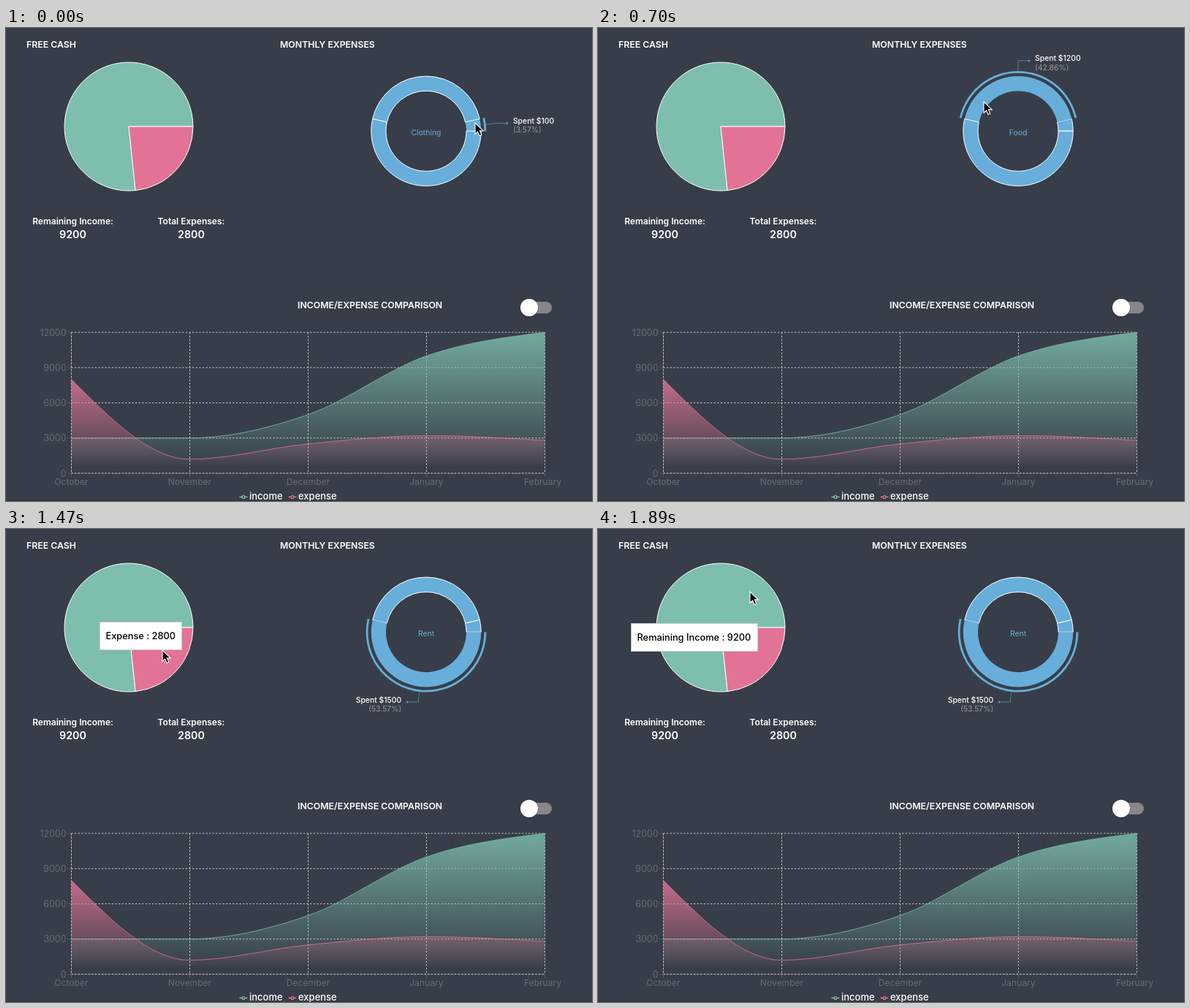
Write an HTML page that moves like this. It is 802 px wide and 648 px high and loops after 1.96 s.

```html
<!DOCTYPE html>
<html lang="en">
<head>
<meta charset="utf-8">
<title>Budget dashboard</title>
<style>
  html, body { margin: 0; width: 100%; height: 100%; overflow: hidden; background: #373e49; }
  svg { display: block; font-family: Inter, "Open Sans", sans-serif; }
  .title { font-size: 12.3px; font-weight: 600; fill: #fff; }
  .label { font-size: 12px; font-weight: 600; fill: #fff; }
  .value { font-size: 14.3px; font-weight: 600; fill: #fff; }
  .axis { font-size: 12.1px; fill: #696c72; }
  .num { font-size: 12.4px; }
  .legend { font-size: 13px; font-weight: 500; fill: #fff; }
  .note { font-size: 10.4px; font-weight: 500; fill: #fff; }
  .soft { font-weight: 400; fill: #999; }
  .mid { text-anchor: middle; }
  .end { text-anchor: end; }
  .tip { font-size: 12.8px; font-weight: 500; fill: #000; }
</style>
</head>
<body>
<svg id="stage" width="802" height="648" viewBox="0 0 802 648">
  <defs id="defs"></defs>
  <rect width="802" height="648" fill="#373e49"/>
  <rect y="647" width="802" height="1" fill="#30353f"/>
  <text class="title" x="28" y="27">FREE CASH</text>
  <text class="title" x="375" y="27">MONTHLY EXPENSES</text>
  <text class="title" x="399" y="384">INCOME/EXPENSE COMPARISON</text>
  <g class="mid">
    <text class="label" x="91.5" y="269">Remaining Income:</text>
    <text class="value" x="91.5" y="288">9200</text>
    <text class="label" x="253.5" y="269">Total Expenses:</text>
    <text class="value" x="253.5" y="288">2800</text>
  </g>
  <rect x="708" y="375" width="39" height="16" rx="8" fill="#888689"/>
  <circle cx="716" cy="384" r="12.3" fill="#000" opacity=".25"/>
  <circle cx="716" cy="383" r="12" fill="#fff"/>
  <g transform="translate(.5 .5)">
    <g id="chart"></g>
    <g id="pie"></g>
    <g id="ring"></g>
  </g>
  <g id="tip">
    <rect x=".5" y=".5" height="38" fill="#fff" stroke="#ccc"/>
    <text class="tip" x="8.5" y="24"></text>
  </g>
  <path id="cursor" d="M0 0V15.2L3.5 12 6 17.6 8.8 16.4 6.4 10.9H11.2Z" fill="#000" stroke="#fff" stroke-width="1.1"/>
</svg>
<script>
const GREEN = '#7ebeae', PINK = '#e27396', BLUE = '#68aedb';
const LOOP = 1960, STEP = 70;
const $ = id => document.getElementById(id);

// Angles are in degrees, counter-clockwise from the right.
function polar(cx, cy, r, deg) {
  const a = deg * Math.PI / 180;
  return [cx + r * Math.cos(a), cy - r * Math.sin(a)];
}

function sector(cx, cy, inner, outer, from, to) {
  const big = to - from > 180 ? 1 : 0;
  const arc = (r, sweep, deg) => `A${r} ${r} 0 ${big} ${sweep} ${polar(cx, cy, r, deg)}`;
  const back = inner ? `L${polar(cx, cy, inner, to)}${arc(inner, 1, from)}` : `L${cx} ${cy}`;
  return `M${polar(cx, cy, outer, from)}${arc(outer, 0, to)}${back}Z`;
}

// Area chart
const X0 = 89, DX = 162, Y0 = 609.5, H = 193;
const months = ['October', 'November', 'December', 'January', 'February'];
const series = [
  { name: 'income', color: GREEN, data: [3000, 3000, 5000, 10000, 12000], legendX: 319 },
  { name: 'expense', color: PINK, data: [8000, 1200, 2500, 3200, 2800], legendX: 386 }
];
const yOf = v => Y0 - v / 12000 * H;

// Monotone cubic through evenly spaced points.
function curve(data) {
  const y = data.map(yOf), n = y.length;
  const d = y.slice(1).map((v, i) => (v - y[i]) / DX);
  const m = y.map((_, i) => {
    if (i === 0 || i === n - 1) return 0;
    const a = d[i - 1], b = d[i];
    return (Math.sign(a) + Math.sign(b)) * Math.min(Math.abs(a), Math.abs(b), Math.abs(a + b) / 4);
  });
  m[0] = (3 * d[0] - m[1]) / 2;
  m[n - 1] = (3 * d[n - 2] - m[n - 2]) / 2;
  let path = `M${X0} ${y[0]}`;
  for (let i = 1; i < n; i++) {
    const x = X0 + i * DX, k = DX / 3;
    path += `C${x - DX + k} ${y[i - 1] + m[i - 1] * k} ${x - k} ${y[i] - m[i] * k} ${x} ${y[i]}`;
  }
  return path;
}

function drawChart() {
  const right = X0 + 4 * DX, top = Y0 - H;
  let axes = `M${X0} ${top}V${Y0}H${right}`, grid = '', text = '', areas = '', legend = '';
  for (let i = 0; i < 5; i++) {
    const x = X0 + i * DX, y = Y0 - i * H / 4;
    axes += `M${x} ${Y0}v5M${X0} ${y}h-5`;
    grid += `M${x} ${top}V${Y0}M${X0} ${y}H${right}`;
    text += `<text class="axis mid" x="${i === 4 ? 734 : x}" y="625">${months[i]}</text>` +
      `<text class="axis num end" x="82" y="${y + 4.5}">${i * 3000}</text>`;
  }
  for (const s of series) {
    const line = curve(s.data), x = s.legendX;
    $('defs').innerHTML += `<linearGradient id="${s.name}" x1="0" y1="0" x2="0" y2="1">
      <stop offset=".05" stop-color="${s.color}" stop-opacity=".8"/>
      <stop offset=".95" stop-color="${s.color}" stop-opacity="0"/></linearGradient>`;
    areas += `<path d="${line}V${Y0}H${X0}Z" fill="url(#${s.name})"/>
      <path d="${line}" fill="none" stroke="${s.color}" stroke-width=".8"/>`;
    legend += `<path d="M${x} 642h3.7m3.6 0h3.7" stroke="${s.color}" stroke-width="1.3"/>
      <circle cx="${x + 5.5}" cy="642" r="1.9" fill="none" stroke="${s.color}" stroke-width="1.3"/>
      <text class="legend" x="${x + 13.5}" y="645.5">${s.name}</text>`;
  }
  $('chart').innerHTML = `<path d="${axes}" fill="none" stroke="#666" stroke-width=".8"/>
    <path d="${grid}" fill="none" stroke="#ccc" stroke-dasharray="2.3"/>${text}${areas}${legend}`;
}

function drawPie() {
  const slice = (from, to, color) =>
    `<path d="${sector(167.5, 134.5, 0, 88, from, to)}" fill="${color}" stroke="#fff"/>`;
  $('pie').innerHTML = slice(0, 276, GREEN) + slice(276, 360, PINK);
}

// Expense ring
const CX = 574.5, CY = 140.7;
const costs = [
  { name: 'Clothing', spent: 100 },
  { name: 'Food', spent: 1200 },
  { name: 'Rent', spent: 1500 }
];
const total = costs.reduce((sum, c) => sum + c.spent, 0);

function callout(c, from, to) {
  const mid = (from + to) / 2, side = Math.cos(mid * Math.PI / 180) > -1e-6 ? 1 : -1;
  const start = polar(CX, CY, 82.5, mid), [mx, my] = polar(CX, CY, 96.5, mid);
  const ex = mx + side * 15, tx = ex + side * 8, cls = side > 0 ? 'note' : 'note end';
  return `<path d="${sector(CX, CY, 79.5, 82.3, from, to)}" fill="${BLUE}"/>
    <g opacity=".75">
      <path d="M${start}L${mx} ${my}H${ex}" fill="none" stroke="${BLUE}" stroke-width=".8"/>
      <circle cx="${ex}" cy="${my}" r="1.5" fill="${BLUE}"/>
    </g>
    <text class="${cls}" x="${tx}" y="${my + 0.5}">Spent $${c.spent}</text>
    <text class="${cls} soft" x="${tx}" y="${my + 13}">(${(c.spent / total * 100).toFixed(2)}%)</text>
    <text class="note mid" x="${CX}" y="146.5" style="font-weight:400;fill:${BLUE}">${c.name}</text>`;
}

let shown = -1;
function drawRing(active) {
  if (active === shown) return;
  shown = active;
  let from = 0, html = '';
  costs.forEach((c, i) => {
    const to = from + c.spent / total * 360, on = i === active;
    html += `<path d="${sector(CX, CY, 55, 75.2, from, to)}" fill="${BLUE}" stroke="${on ? 'none' : '#fff'}"/>`;
    if (on) html += callout(c, from, to);
    from = to;
  });
  $('ring').innerHTML = html;
}

// Pointer stops: time, x, y
const stops = [
  [0, 642, 130], [420, 618, 92], [560, 575, 81], [700, 528, 101], [980, 505, 158],
  [1470, 214, 166], [1610, 205, 163], [1680, 203, 140], [1750, 206, 87], [1890, 208, 86]
];
const mix = (a, b, p) => a + (b - a) * p;

function pointerAt(t) {
  let i = 0;
  while (i < stops.length - 2 && t >= stops[i + 1][0]) i++;
  const [t0, x0, y0] = stops[i], [t1, x1, y1] = stops[i + 1];
  const p = (t - t0) / (t1 - t0);
  return [mix(x0, x1, p), mix(y0, y1, p)];
}

// cubic-bezier(.25, .1, .25, 1)
function ease(x) {
  if (x >= 1) return 1;
  let lo = 0, hi = 1;
  const bez = (a, b, u) => 3 * a * u * (1 - u) ** 2 + 3 * b * u * u * (1 - u) + u ** 3;
  for (let i = 0; i < 24; i++) {
    const u = (lo + hi) / 2;
    if (bez(0.25, 0.25, u) < x) lo = u; else hi = u;
  }
  return bez(0.1, 1, lo);
}

const tips = [
  { at: 1395, text: 'Expense : 2800', width: 112, from: [145, 110], to: [83, 173] },
  { at: 1708, text: 'Remaining Income : 9200', width: 173, from: [83, 173], to: [33, 115] }
];

function drawTip(t) {
  const tip = tips.filter(s => t >= s.at).pop(), box = $('tip');
  box.style.display = tip ? '' : 'none';
  if (!tip) return;
  const p = ease((t - tip.at) / 400);
  const [x, y] = tip.from.map((v, i) => Math.round(mix(v, tip.to[i], p)));
  box.setAttribute('transform', `translate(${x} ${y})`);
  box.querySelector('rect').setAttribute('width', tip.width);
  box.querySelector('text').textContent = tip.text;
}

function render(now) {
  const t = Math.floor((now % LOOP) / STEP) * STEP;
  drawRing(t < 70 ? 0 : t < 840 ? 1 : 2);
  drawTip(t);
  $('cursor').setAttribute('transform', `translate(${pointerAt(t)})`);
}

drawChart();
drawPie();
const begin = performance.now();
function tick() {
  render(performance.now() - begin);
  requestAnimationFrame(tick);
}
tick();
</script>
</body>
</html>
```
